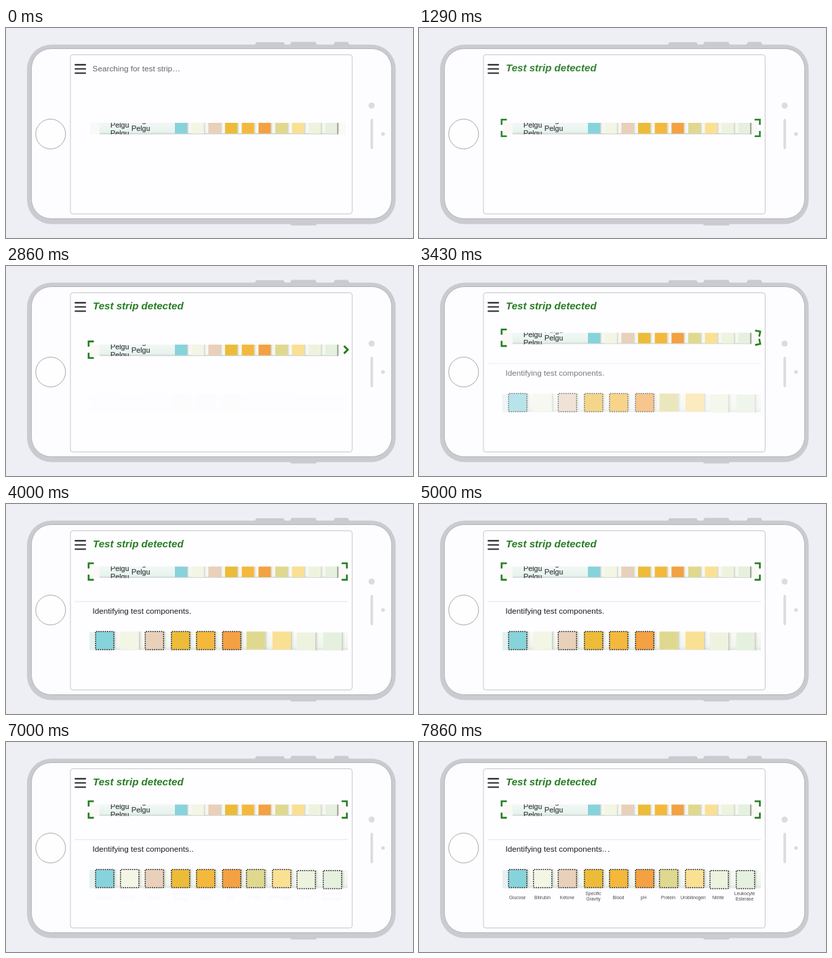
An HTML page that plays this animation: 600x310 px, repeating every 8000 ms.

```html
<!DOCTYPE html>
<html lang="en">
<head>
<meta charset="utf-8">
<title>Test strip scan</title>
<style>
  html, body { margin: 0; width: 100%; height: 100%; overflow: hidden; background: #eeeff4; }
  svg { display: block; width: 600px; height: 310px; font-family: "Liberation Sans", Arial, sans-serif; }
  .corner { fill: none; stroke: #267d22; stroke-width: 2.6; }
  .mark { fill: none; stroke: #222; stroke-width: 1.5; stroke-dasharray: 1.7 1.5; }
  .label { font-size: 6.7px; fill: #4a4a4a; text-anchor: middle; }
  .brand { font-size: 10.8px; fill: #3a3d3f; stroke: #3a3d3f; stroke-width: .2; }
</style>
</head>
<body>
<svg viewBox="0 0 600 310">
  <defs>
    <linearGradient id="edge">
      <stop offset="0" stop-color="#aeb3a8" stop-opacity=".75"/>
      <stop offset="1" stop-color="#e8ece6" stop-opacity="0"/>
    </linearGradient>
    <linearGradient id="base" x2="0" y2="1">
      <stop offset="0" stop-color="#f1f8f5"/>
      <stop offset=".8" stop-color="#e7f3ee"/>
      <stop offset="1" stop-color="#cdd4cf"/>
    </linearGradient>
    <linearGradient id="row" x2="0" y2="1">
      <stop offset="0" stop-color="#f9faf4"/>
      <stop offset=".8" stop-color="#f1f5ef"/>
      <stop offset="1" stop-color="#dfe5de"/>
    </linearGradient>
    <clipPath id="stripClip"><rect x="124" y="140" width="376" height="17"/></clipPath>
  </defs>

  <!-- phone -->
  <rect width="600" height="310" fill="#eeeff4"/>
  <g fill="#c9cbd0">
    <path d="M366 26L369 21H409L412 26ZM418 26L421 20.5H456L459 26ZM482 26L485 20.5H504L507 26ZM418 287H459L457 291.5H420Z"/>
    <rect x="31" y="24.5" width="543.5" height="265" rx="36"/>
  </g>
  <rect x="37.5" y="30.5" width="531" height="251" rx="29" fill="#fdfdff" stroke="#b3b5b9"/>
  <circle cx="65.8" cy="156.5" r="22" fill="#fefeff" stroke="#a9a9ac"/>
  <g fill="#dcdce0">
    <circle cx="539" cy="114.5" r="4.5"/>
    <rect x="537.3" y="134" width="3.8" height="45" rx="1.9"/>
    <circle cx="555.8" cy="156.5" r="2.7"/>
  </g>
  <rect x="95" y="39.5" width="415.3" height="235" rx="3.5" fill="#fefdff" stroke="#c6c6c9"/>
  <path d="M102.3 54.2H116.9M102.3 60.4H116.9M102.3 66.6H116.9" stroke="#3b3b3d" stroke-width="2.4" stroke-linecap="round"/>

  <text id="searching" x="127.6" y="63.8" font-size="11.75" fill="#666">Searching for test strip…</text>
  <text id="detected" x="128" y="64.3" font-size="15.1" font-weight="bold" font-style="italic" fill="#267d22">Test strip detected</text>

  <g id="strip"></g>
  <g id="corners"></g>

  <g id="section">
    <path d="M101 144H504" stroke="#e2e2e4"/>
    <text x="127.6" y="162" font-size="11.7" fill="#1e1e1e">Identifying test components.<tspan id="dot2">.</tspan><tspan id="dot3" dx="1.5">.</tspan></text>
    <g id="pads"></g>
    <g id="earlyMarks"></g>
    <g id="lateMarks"></g>
  </g>
  <g id="labels"></g>
</svg>

<script>
const LOOP = 8000;
const $ = id => document.getElementById(id);
const colors = ['#87d3dc', '#f3f5e5', '#e9d0ba', '#ecbc38', '#f4b83c',
                '#f3a142', '#dfd98f', '#fae093', '#edf3df', '#e6f0df'];
const names = ['Glucose', 'Bilirubin', 'Ketone', 'Specific Gravity', 'Blood',
               'pH', 'Protein', 'Urobilinogen', 'Nitrite', 'Leukocyte Esterase'];
const centers = [145.5, 182.3, 218.8, 257.3, 294.3, 332.7, 368, 406.3, 442.5, 481.2];
const labelCenters = [145, 182, 218.3, 257, 294, 331, 367.3, 404, 441, 480];
const early = [0, 2, 3, 4, 5];

function add(parent, tag, attrs, text) {
  const node = document.createElementNS('http://www.w3.org/2000/svg', tag);
  for (const key in attrs) node.setAttribute(key, attrs[key]);
  if (text) node.textContent = text;
  return parent.appendChild(node);
}
const rect = (parent, x, y, width, height, fill) =>
  add(parent, 'rect', { x, y, width, height, fill });

function pad(parent, x, y, size, height, color) {
  rect(parent, x + size, y, size * .2, height, 'url(#edge)');
  rect(parent, x, y, size, height, color);
}

function buildStrip() {
  const strip = add($('strip'), 'g', { 'clip-path': 'url(#stripClip)' });
  rect(strip, 124, 140, 376, 17, '#faf9f5');
  rect(strip, 138, 140, 352, 17, 'url(#base)');
  rect(strip, 267, 140, 222, 15, '#f6f8f2');
  colors.forEach((color, i) => pad(strip, 249 + i * 24.65, 140, 18, 15.8, color));
  rect(strip, 488, 140, 2, 17, '#a3a79f');
  for (const [x, y] of [[154, 146.6], [154, 158.8], [185, 152], [185, 140.2]])
    add(strip, 'text', { x, y, class: 'brand' }, 'Pelgu');
}

function buildPads() {
  const row = $('pads');
  rect(row, 123, 189, 381, 26.5, 'url(#row)');
  rect(row, 123, 189, 8, 26.5, '#e4f1f0');
  centers.forEach((cx, i) => {
    const x = cx - 13.5, y = i > 7 ? 189.8 : 188.3;
    pad(row, x, y, 27, 26.5, colors[i]);
    const marks = early.includes(i) ? $('earlyMarks') : $('lateMarks');
    add(marks, 'rect', { x, y, width: 27, height: 26.8, rx: 1, class: 'mark' });
  });
}

function buildLabels() {
  names.forEach((name, i) => {
    const lines = name.split(' ');
    lines.forEach((line, n) => add($('labels'), 'text', {
      x: labelCenters[i], y: lines.length > 1 ? 226 + n * 8 : 231.5, class: 'label'
    }, line));
  });
}

// Each corner is drawn around its own centre, pointing to the upper right.
const corner = () => add($('corners'), 'path', { d: 'M-4.5 -3.2H3.2V4.5', class: 'corner' });
const place = (node, x, y, turn) =>
  node.setAttribute('transform', `translate(${x} ${y}) rotate(${turn})`);

buildStrip();
buildPads();
buildLabels();
const [topLeft, bottomLeft, rightA, rightB] = [0, 0, 0, 0].map(corner);

function ease(time, from, to) {
  const t = Math.min(1, Math.max(0, (time - from) / (to - from)));
  return (1 - Math.cos(Math.PI * t)) / 2;
}
const fade = (id, value) => $(id).setAttribute('opacity', value);
const fadeDot = (id, value) => $(id).setAttribute('fill-opacity', value);

function draw(time) {
  const found = ease(time, 100, 1500);
  const move = ease(time, 1785, 3935);
  const second = ease(time, 5000, 6000);
  const third = ease(time, 6860, 7860);
  const rise = -47.8 * move;
  const middle = 147.5 + rise;
  const reach = 9;

  fade('searching', 1 - found);
  fade('detected', found);
  fade('corners', found);
  $('strip').setAttribute('transform', `translate(0 ${rise})`);

  // The two right corners trade places while turning.
  const swing = reach * (1 - 2 * move);
  place(topLeft, 125, middle - reach, -90);
  place(bottomLeft, 125, middle + reach, 180);
  place(rightA, 499.3, middle - swing, 90 * move);
  place(rightB, 499.3, middle + swing, 90 * (1 - move));

  fade('section', ease(time, 2830, 3910));
  fade('lateMarks', second);
  fadeDot('dot2', second);
  fadeDot('dot3', third);
  fade('labels', third);
}

const start = performance.now();
function tick() {
  draw((performance.now() - start) % LOOP);
  requestAnimationFrame(tick);
}
tick();
</script>
</body>
</html>
```
